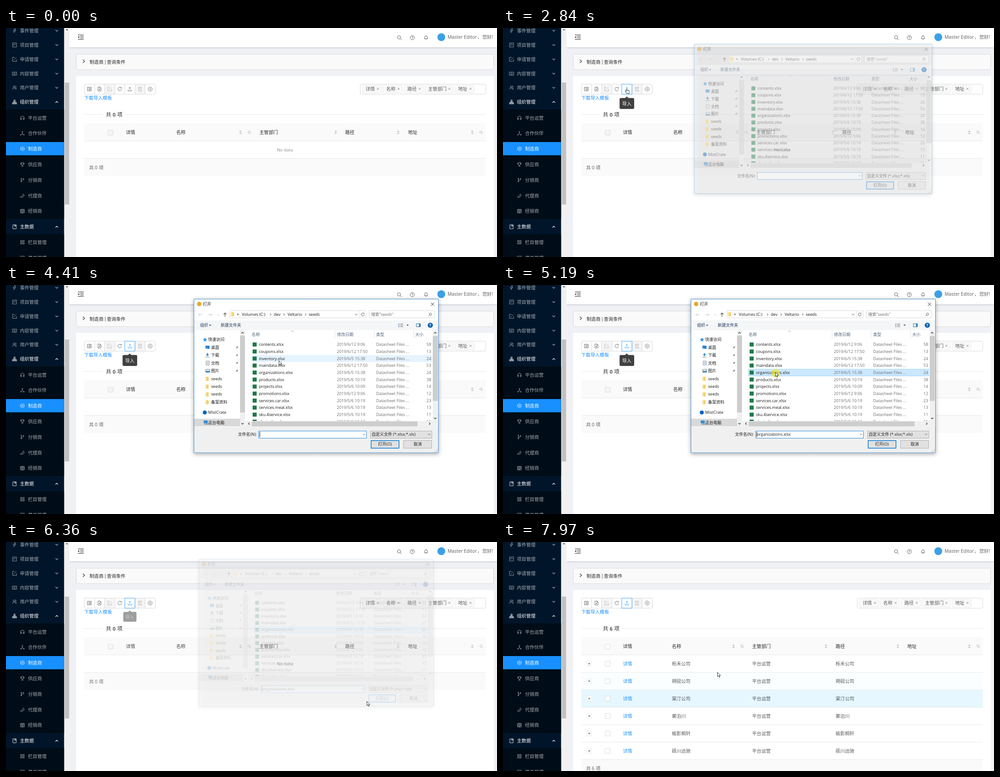
Recreate the animation shown at these times as an HTML page with a canvas. Size 1093 px wide and 512 px high, loop 8000 ms.

```html
<!DOCTYPE html>
<html lang="zh-CN">
<head>
<meta charset="utf-8">
<title>组织管理</title>
<style>
html,body{margin:0;width:100%;height:100%;overflow:hidden;background:#f0f2f5}
canvas{display:block;width:1093px;height:512px}
</style>
</head>
<body>
<canvas id="stage"></canvas>
<script>
const W = 1093, H = 512, LOOP = 8000;
const canvas = document.getElementById('stage');
const c = canvas.getContext('2d');
const dpr = window.devicePixelRatio || 1;
canvas.width = W * dpr;
canvas.height = H * dpr;

const FONT = '"Open Sans","Noto Sans CJK SC","Noto Sans CJK",sans-serif';
const BLUE = '#1890ff', INK = 'rgba(0,0,0,.85)', BODY = 'rgba(0,0,0,.65)', DIM = 'rgba(0,0,0,.45)';

// Line icons in a 10 x 10 box
const ring = (x, y, r) => `M${x - r} ${y}a${r} ${r} 0 1 0 ${2 * r} 0a${r} ${r} 0 1 0 ${-2 * r} 0`;
const ICON = {
  bolt: 'M5.5 .5L2 5.5h2.5L3.5 9.5 8 4H5.5L7 .5z',
  board: 'M.5 .5h9v9h-9zM3 2.5v4.5M5 2.5v2M7 2.5v3',
  edit: 'M9.5 5v4.5h-9v-9H5M3.5 6.5L9 1',
  read: 'M.2 1.5H4L5 2.3 6 1.5h3.8v7H6L5 9 4 8.5H.2zM5 2.3V9M1.7 4h1.6M1.7 6h1.6M6.7 4h1.6M6.7 6h1.6',
  team: ring(4, 3, 2) + 'M.5 9.5Q1 5.5 4 5.5T7.5 9.5M6.5 1Q9 1 8.5 3 8.3 4.5 7 5 9 6 9.5 9',
  tree: 'M3.5 .5h3v3h-3zM.3 7h2.4v2.4H.3zM3.8 7h2.4v2.4H3.8zM7.3 7h2.4v2.4H7.3zM5 3.5V7M1.5 7V5.2h7V7',
  phones: 'M.8 9V5a4.2 4.2 0 0 1 8.4 0V9H7V5.8h2.2M.8 5.8H3V9H.8',
  nodes: ring(5, 1.6, 1.1) + ring(1.5, 8.4, 1) + ring(8.5, 8.4, 1) + 'M5 2.8v3L2.3 7.7M5 5.8l2.7 1.9',
  gear: 'M5 .2L9.2 2.6v4.8L5 9.8 .8 7.4V2.6z' + ring(5, 5, 1.6),
  cup: 'M2.5 .8h5v3.5a2.5 2.5 0 0 1-5 0zM2.5 2H.7q0 3 2 3.2M7.5 2h1.8q0 3-2 3.2M5 7v2M2.5 9.3h5',
  branch: ring(2.5, 1.6, 1.1) + ring(2.5, 8.4, 1.1) + ring(7.5, 2.2, 1.1) + 'M2.5 2.8v4.4M7.5 3.3Q7.5 5 5 5.5T2.5 7.2',
  call: 'M7 .8L9.3 3Q9 8.5 1.5 9.3L.8 7 3 5.8 4.2 6.6Q6 5.5 6.5 4L5.7 3z',
  shop: 'M.5 .8h9v8.5h-9zM.5 3.6h9M.5 6h9M3.5 .8v2.8M6.5 .8v2.8M4 9.3V7.5h2v1.8',
  book: 'M1.2 .5h7.6v9H1.2zM5 .5v3.5l1.2-.8 1.2.8V.5',
  apps: 'M.8 .8h3.2v3.2H.8zM6 .8h3.2v3.2H6zM.8 6h3.2v3.2H.8zM6 6h3.2v3.2H6z',
  menu: 'M.5 1h9v8h-9zM2.5 3.5h5M2.5 5.5h5',
  list: 'M.5 .8h9v8.4h-9zM2.2 3h.8M4 3h4M2.2 5h.8M4 5h4M2.2 7h.8M4 7h4',
  add: 'M1.5 .2h4.5l2.5 2.5v7h-7zM6 .2V2.7h2.5M5 4.2v3.4M3.3 5.9h3.4',
  reload: 'M8.6 2.6A4.3 4.3 0 1 0 9.3 5.2M8.9 .6v2.2H6.7',
  upload: 'M.7 6.5v2.8h8.6V6.5M5 7V.8M3 2.8L5 .8l2 2',
  report: 'M8.5 4.5V.5h-7v9h3M3 2.8h4M3 4.8h2.5M5 9.5L7 6l2 3.5z',
  cancel: ring(5, 5, 4.7) + 'M3.4 3.4l3.2 3.2M6.6 3.4L3.4 6.6',
  search: ring(4, 4, 3.4) + 'M6.5 6.5L9.6 9.6',
  help: ring(5, 5, 4.7) + 'M3.6 4Q3.7 2.6 5 2.6T6.4 3.9Q6.4 4.7 5 5.4v.8M5 7v.8',
  bell: 'M1 8h8M2 8V4.5a3 3 0 0 1 6 0V8M4 9.6h2M5 1.5V.4',
  star: 'M5 0L6.5 3.4 10 3.8 7.4 6.2 8.2 10 5 8 1.8 10 2.6 6.2 0 3.8 3.5 3.4z',
  pin: 'M6 1l3 3-2.5 1L5 8 2 5l3-1.5zM3.5 6.5L1 9'
};
const paths = Object.fromEntries(Object.entries(ICON).map(([k, d]) => [k, new Path2D(d)]));
const ARROW = new Path2D('M0 0V9.6L2.2 7.6 3.8 11.2 5.3 10.5 3.7 7.1H6.8z');
const HAND = new Path2D('M0 1Q1 -.6 2 1V4l4 .9Q7.2 5.3 7 6.6L6 11H1.3L-2 6.8Q-1.6 5.6 0 6.8z');

function text(s, x, y, color = BODY, size = 10.33, weight = 400, align = 'left') {
  c.font = `${weight} ${size}px ${FONT}`;
  c.textAlign = align;
  c.fillStyle = color;
  c.fillText(s, x, y + size * .37);
}
function rect(x, y, w, h, color) {
  c.fillStyle = color;
  c.fillRect(x, y, w, h);
}
// Outer size includes the border
function box(x, y, w, h, fill, stroke, r = 0, lw = 1) {
  const inset = stroke ? lw / 2 : 0;
  c.beginPath();
  c.roundRect(x + inset, y + inset, w - 2 * inset, h - 2 * inset, r);
  if (fill) { c.fillStyle = fill; c.fill(); }
  if (stroke) { c.strokeStyle = stroke; c.lineWidth = lw; c.stroke(); }
}
function dot(x, y, r, color) {
  c.beginPath();
  c.arc(x, y, r, 0, 7);
  c.fillStyle = color;
  c.fill();
}
function line(color, lw, ...p) {
  c.beginPath();
  for (let i = 0; i < p.length; i += 2) c.lineTo(p[i], p[i + 1]);
  c.strokeStyle = color;
  c.lineWidth = lw;
  c.stroke();
}
function tri(x, y, w, h, color) {
  c.beginPath();
  c.moveTo(x - w, y - h);
  c.lineTo(x + w, y - h);
  c.lineTo(x, y + h);
  c.fillStyle = color;
  c.fill();
}
function icon(name, x, y, color, k = 1, fill) {
  c.save();
  c.translate(x - 5 * k, y - 5 * k);
  c.scale(k, k);
  c.strokeStyle = c.fillStyle = color;
  c.lineWidth = .85 / k;
  fill ? c.fill(paths[name]) : c.stroke(paths[name]);
  c.restore();
}
const chev = (x, y, w, h, color, lw = 1) => line(color, lw, x - w, y - h, x, y + h, x + w, y - h);
const chevR = (x, y, w, h, color, lw = 1) => line(color, lw, x - w, y - h, x + w, y, x - w, y + h);
function cross(x, y, r, color, lw = .9) {
  line(color, lw, x - r, y - r, x + r, y + r);
  line(color, lw, x - r, y + r, x + r, y - r);
}
const ramp = (t, a, b) => Math.max(0, Math.min(1, (t - a) / (b - a)));

// Bursts of activity: start, end, steps
const BURSTS = [[440, 1210, 11], [1360, 2160, 11], [2230, 2460, 4], [2610, 3400, 11], [3480, 4090, 9],
  [4260, 4720, 7], [4970, 5730, 11], [5810, 6580, 11], [6650, 7040, 6], [7570, 7660, 2], [7830, 7970, 3]];
function snap(t) {
  let out = 0;
  for (const [a, b, n] of BURSTS) {
    if (t < a) break;
    const step = (b - a) / (n - 1);
    out = a + Math.min(n - 1, Math.floor((t - a + 20) / step)) * step;
  }
  return out;
}

// Pointer route: time, x, y
const ROUTE = [[440, 966, 477], [640, 850, 425], [920, 540, 312], [1210, 382, 256], [1290, 382, 256],
  [1760, 302, 194.5], [2160, 271, 144], [2230, 272, 140], [2460, 274, 135], [2850, 274, 135],
  [3150, 380, 150], [3400, 500, 165], [3709, 580, 168.5], [3860, 600, 160], [4090, 608, 150],
  [4190, 608, 150], [4720, 606, 194.5], [5200, 606, 194.5], [5450, 690, 262], [5730, 786, 330],
  [5887, 803, 341], [6040, 838, 354], [6270, 838, 354], [6580, 700, 361], [6810, 647, 361],
  [7500, 647, 361], [7570, 656, 361], [7660, 667, 361], [7760, 667, 361], [7900, 560, 318], [7970, 477, 291]];
function pointer(t) {
  let i = 0;
  while (i < ROUTE.length - 2 && t > ROUTE[i + 1][0]) i++;
  const [a, x, y] = ROUTE[i], [b, u, v] = ROUTE[i + 1], k = ramp(t, a, b);
  return [x + (u - x) * k, y + (v - y) * k];
}
const CLICKS = [[2610, 2760], [5040, 5260], [6110, 6260]];

const TOP = [['bolt', '事件管理', 6], ['board', '项目管理', 38], ['edit', '申请管理', 70], ['read', '内容管理', 102],
  ['team', '用户管理', 133.5], ['tree', '组织管理', 165.5, 1], ['book', '主数据', 444.5, 1]];
const SUB = [['phones', '平台运营', 201], ['nodes', '合作伙伴', 235.5], ['gear', '制造商', 270], ['cup', '供应商', 305],
  ['branch', '分销商', 340], ['call', '代理商', 375], ['shop', '经销商', 409.5], ['apps', '栏目管理', 479], ['menu', '菜单管理', 514]];

function sidebar() {
  rect(129, 0, 12.5, H, '#f1f1f1');
  rect(131, 122, 9.5, 272.5, '#c1c1c1');
  tri(135.7, 3.5, 2.6, -1.5, '#505050');
  rect(0, 0, 129.3, H, '#001529');
  rect(0, 182, 129.3, 245, '#000c17');
  rect(0, 461, 129.3, 51, '#000c17');
  rect(0, 255, 129.3, 29.6, BLUE);
  const grey = 'rgba(255,255,255,.65)';
  for (const [ic, s, y, open] of TOP) {
    const col = open ? '#fff' : grey;
    icon(ic, 19, y, col);
    text(s, 31, y, col);
    chev(113, y, 2.8, open ? -1.5 : 1.5, col, 1.1);
  }
  for (const [ic, s, y] of SUB) {
    const col = y === 270 ? '#fff' : grey;
    icon(ic, 36.5, y, col, .95);
    text(s, 49, y, col);
  }
}

function header() {
  c.save();
  c.shadowColor = 'rgba(0,21,41,.2)';
  c.shadowBlur = 4 * dpr;
  c.shadowOffsetY = dpr;
  rect(141, 0, 952, 43, '#fff');
  c.restore();
  for (const [x, y] of [[160, 15.5], [165, 18.8], [165, 22.2], [160, 25.5]]) line('#333', 1.1, x, y, 173, y);
  c.beginPath();
  c.moveTo(160, 20.5); c.lineTo(163, 18); c.lineTo(163, 23);
  c.fillStyle = '#333';
  c.fill();
  icon('search', 876, 22, '#444', 1.05);
  icon('help', 904.5, 21.5, '#444');
  icon('bell', 935, 21, '#444', .95);
  dot(969, 20.5, 8.7, '#3ba0e6');
  text('Master Editor', 983, 20.5);
  text('，', 1049, 20.5);
  text('您好!', 1060.5, 20.5);
}

function toolbar(t) {
  const edges = i => 174 + i * 22.57;
  const hot = t >= 2230;
  ['list', 'add', 'edit', 'reload', 'upload', 'report', 'cancel'].forEach((ic, i) => {
    const off = i === 2 || i === 5, x = Math.round(edges(i));
    box(x, 125, Math.round(edges(i + 1)) - x + 1, 23.5, off ? '#f5f5f5' : '#fff', '#d9d9d9', i % 6 ? 0 : 2);
    icon(ic, edges(i) + 11.5, 136.5, off ? 'rgba(0,0,0,.28)' : hot && i === 4 ? BLUE : BODY, .95);
  });
  if (hot) box(264, 125, 23.5, 23.5, null, '#40a9ff');
  text('下载导入模板', 174, 156, BLUE);
  box(788, 125, 280.5, 23.5, '#fff', '#d9d9d9', 3);
  for (const [s, x, w] of [['详情', 793, 43.5], ['名称', 839, 43.5], ['路径', 886, 43.5], ['主管部门', 932, 63.5], ['地址', 999, 43.5]]) {
    box(x, 128, w, 17.5, '#fafafa', '#e8e8e8', 2);
    text(s, x + 7.5, 136.5);
    cross(x + w - 8.5, 136, 2.4, DIM);
  }
}

function tooltip(t) {
  const show = ramp(t, 2190, 2420) * (1 - ramp(t, 6270, 6430));
  if (!show) return;
  c.save();
  c.globalAlpha = show;
  c.translate(275.5, 153);
  c.scale(.8 + .2 * show, .8 + .2 * show);
  tri(0, 2, 4, -2, '#404040');
  box(-16, 3.5, 32.5, 24.5, '#404040', null, 3);
  text('导入', 0, 16, '#fff', 10.33, 400, 'center');
  c.restore();
}

const FIRMS = ['栎禾公司', '朔砚公司', '棠汀公司', '蘅泊川', '榆影桐轩', '砾川远驰'];
// Header columns: label, x, sorter x, search x
const EMPTY = [['详情', 267], ['名称', 379, 522, 542], ['主管部门', 564, 734], ['路径', 755, 873], ['地址', 895, 1038, 1058]];
const FILLED = [['详情', 267], ['名称', 376, 513, 532.5], ['主管部门', 554.5, 719], ['路径', 740.5, 879], ['地址', 900, 1038, 1058]];

function table(t) {
  const full = t >= 6490, n = full ? '6' : '0';
  line('#e8e8e8', 1, 174, 193.5, 215, 193.5);
  line('#e8e8e8', 1, 266, 193.5, 1068, 193.5);
  text('共', 222.5, 193.5, INK, 11.8);
  text(n, 237.5, 193.5, INK, 11, 600);
  text('项', 247.5, 193.5, INK, 11.8);

  c.save();
  if (t >= 6340) c.globalAlpha = full ? .5 + .5 * ramp(t, 6580, 7040) : 1 - .5 * ramp(t, 6300, 6490);
  rect(174, 213, 894, 39, '#fafafa');
  rect(174, 252, 894, 1, '#e8e8e8');
  box(227, 228, 12, 12, full ? '#fff' : '#f5f5f5', '#d9d9d9', 1.5);
  for (const [s, x, sort, find] of full ? FILLED : EMPTY) {
    text(s, x, 233.5, INK);
    if (sort) {
      tri(sort, 230.7, 3, -1.6, '#bfbfbf');
      tri(sort, 236, 3, 1.6, '#bfbfbf');
    }
    if (find) icon('search', find, 233.5, '#aaa', .75);
  }
  let foot = 291;
  if (full) {
    FIRMS.forEach((s, i) => {
      const top = 253 + i * 38.9, y = 272.2 + i * 38.9;
      if (i === 2) rect(174, top, 894, 38.5, '#e6f7ff');
      if (i === 1 && t >= 7965) rect(174, top, 894, 38.5, '#fafeff');
      rect(174, Math.round(top + 38), 894, 1, '#e8e8e8');
      box(186, Math.round(y - 6), 12, 12, '#fff', '#e8e8e8', 1);
      const m = Math.round(y - 6) + 6;
      line(BODY, .9, 189.7, m, 194.3, m);
      line(BODY, .9, 192, m - 2.3, 192, m + 2.3);
      box(227, Math.round(y - 6), 12, 12, '#fff', '#d9d9d9', 1.5);
      text('详情', 267, y, BLUE);
      text(s, 376, y);
      text('平台运营', 554.5, y);
      text(s, 740.5, y);
    });
    foot = 486;
  } else {
    text('No data', 621, 272, DIM, 9.8, 400, 'center');
    rect(174, 291, 894, 1, '#e8e8e8');
  }
  rect(174, foot + 1, 894, 39, '#fafafa');
  const fy = full ? 506 : 312;
  text('共', 185, fy);
  text(n, 197.7, fy, BODY, 10);
  text('项', 206.7, fy);
  c.restore();
}

const FILES = ['contents|6/12 9:06|58', 'coupons|6/12 17:50|13', 'inventory|6/5 15:38|24', 'maindata|6/12 17:50|53',
  'organizations|6/5 15:38|24', 'products|5/6 10:19|38', 'projects|5/6 10:09|14', 'promotions|6/12 9:06|12',
  'services.car|5/6 10:19|23', 'services.meal|5/6 10:19|13', 'sku.4service|5/6 10:19|11', 'sku.index|5/6 10:19|11']
  .map(s => s.split('|'));
const ROW = 15.68, D = '#1a1a1a', G = '#6d6d6d';
const small = (s, x, y, col = D) => text(s, x, y, col, 9.05);

function folder(x, y) {
  rect(x - 4, y - 4, 7, 9, '#f5cf6a');
  rect(x - 4, y - 4, 2.5, 9, '#fbe29a');
}

function navPane(t) {
  rect(419, 299, 102, 17, '#d9d9d9');
  icon('star', 443, 122, '#2b95e8', .95, true);
  small('快速访问', 450, 122);
  ['桌面', '下载', '文档', '图片', 'seeds', 'seeds', 'seeds', '备案资料'].forEach((s, i) => {
    const y = 139.7 + i * 17.4;
    if (i > 3) folder(448, y);
    else {
      icon('pin', 514, y, '#777', .75, true);
      if (i === 0) { rect(444, y - 4, 9, 7, '#1b82d2'); rect(445, y + 1, 3, 1, '#fff'); }
      if (i === 1) { rect(444, y + 3, 9, 1.5, '#8aa'); line('#1b82d2', 2, 448.5, y - 5, 448.5, y); tri(448.5, y, 3.5, 2, '#1b82d2'); }
      if (i === 2) { box(445, y - 5, 8, 10, '#fff', '#888'); rect(447, y - 2, 4, 1, '#3a8fd0'); rect(447, y + 1, 4, 1, '#3a8fd0'); }
      if (i === 3) { box(444, y - 4, 10, 8, '#dff0fb', '#888'); rect(445, y, 8, 3, '#3a8fd0'); }
    }
    small(s, 456.5, y);
  });
  dot(442.5, 285, 4.5, '#0a64c0');
  small('MistCrate', 450, 285);
  rect(440, 303, 9, 6, '#2f8fd8');
  rect(442, 310, 8, 1.5, '#667');
  small('这台电脑', 450, 308);

  const k = ramp(t, 3180, 3320) * (1 - ramp(t, 3709, 4060));
  if (k) {
    c.save();
    c.globalAlpha *= k;
    chev(427, 122.5, 3, 1.5, '#555');
    chevR(427, 285, 1.5, 3, '#aaa');
    chevR(427, 308, 1.5, 3, '#aaa');
    c.restore();
  }
  rect(521, 101, 11, 216, '#f0f0f0');
  rect(521, 113, 11, 172, '#cdcdcd');
  chev(526.5, 107, 2.5, -1.3, '#444', 1.3);
  chev(526.5, 310, 2.5, 1.3, '#444', 1.3);
}

function fileList(t, px, py) {
  small('名称', 547, 111, '#4c607a');
  small('修改日期', 737, 111, '#4c607a');
  small('类型', 824, 111, '#4c607a');
  small('大小', 911, 111, '#4c607a');
  for (const x of [732, 819, 907]) rect(x, 101, 1, 19, '#e2e2e2');
  chev(637.5, 103.5, 2.6, -1.2, '#777', .8);

  c.save();
  c.beginPath();
  c.rect(533, 120, 416, 184);
  c.clip();
  const over = px > 546 && px < 949 && py < 304 ? Math.floor((py - 125.2) / ROW) : -1;
  FILES.forEach(([name, date, kb], i) => {
    const y = 133 + i * ROW;
    if (i === 4 && t >= 5040) box(546, y - 8, 404, 16, '#cce8ff', '#99d1ff');
    else if (i === over) rect(546, y - 7.8, 404, ROW, '#e5f3ff');
    rect(549, y - 4.5, 9, 9, '#1f7a48');
    small(name + '.xlsx', 563, y);
    small('2019/' + date, 736.5, y, G);
    small('Datasheet Files ...', 824, y, G);
    small(kb, 936, y, G);
  });
  c.restore();
  rect(950, 101, 11, 203, '#f0f0f0');
  rect(950, 114, 11, 145, '#cdcdcd');
  chev(955.5, 107, 2.5, -1.3, '#444', 1.3);
  chev(955.5, 298, 2.5, 1.3, '#444', 1.3);
  rect(533, 304, 428, 13, '#f0f0f0');
  rect(547, 305, 369, 11, '#cdcdcd');
  chevR(541, 310, -1.3, 2.6, '#444', 1.3);
  chevR(943, 310, 1.3, 2.6, '#444', 1.3);
}

function dialog(t, px, py) {
  const show = ramp(t, 2790, 2920) * (1 - ramp(t, 6250, 6370));
  if (!show) return;
  c.save();
  c.globalAlpha = show;
  const k = .95 + .05 * show;
  c.translate(690 - 690 * k, 203 - 203 * k);
  c.scale(k, k);
  c.save();
  c.shadowColor = 'rgba(0,0,0,.35)';
  c.shadowBlur = 9 * dpr;
  c.shadowOffsetY = 2 * dpr;
  rect(418, 31, 545, 344.5, '#fff');
  c.restore();

  dot(430, 42.5, 5, '#e6a72e');
  small('打开', 438.5, 43);
  cross(949.5, 43, 3.6, '#222', 1);

  for (const [x, s] of [[433, 1], [454.5, -1]]) {
    line('#c4c4c4', 1, x - 4, 66.5, x + 4, 66.5);
    line('#c4c4c4', 1, x - s, 63.5, x - 4 * s, 66.5, x - s, 69.5);
  }
  chev(472.5, 66.5, 2, 1, '#bbb');
  line('#444', 1.1, 487.5, 71, 487.5, 62.5);
  line('#444', 1.1, 484.3, 65.7, 487.5, 62.5, 490.7, 65.7);
  box(498, 57, 304, 17, '#fff', '#d9d9d9');
  folder(504.5, 65);
  small('«', 514, 65);
  small('Volumes (C:)', 525, 65.5);
  small('dev', 596, 65.5);
  small('Veltario', 627, 65.5);
  small('seeds', 674, 65.5);
  for (const x of [589, 619, 667]) chevR(x, 66, 1.3, 2.5, '#444');
  chev(779.5, 66, 2.6, 1.4, '#444');
  rect(786, 58, 1, 15, '#e2e2e2');
  icon('reload', 794, 66, '#444', .8);
  box(808, 57, 147, 17, '#fff', '#d9d9d9');
  small('搜索"seeds"', 813, 65.5, G);
  c.save();
  c.translate(944, 66);
  c.scale(-1, 1);
  icon('search', 0, 0, '#444', .75);
  c.restore();

  rect(419, 79, 543, 22, '#f5f6f7');
  small('组织', 432, 90, '#1e395b');
  tri(454.5, 90.3, 2.6, 1.3, '#1e395b');
  small('新建文件夹', 478, 90, '#1e395b');
  for (const y of [86.5, 89.5, 92.5]) {
    rect(873, y, 3, 1.4, '#6a8db0');
    rect(877.5, y, 6.5, 1.2, '#888');
  }
  tri(894, 90, 2.5, 1.3, '#333');
  box(913, 86, 10, 8, '#fff', '#2b6fa8');
  rect(919, 87, 3, 6, '#3f8fd0');
  dot(944.5, 90, 5.8, '#0a62b3');
  text('?', 944.5, 90, '#fff', 9, 700, 'center');

  navPane(t);
  fileList(t, px, py);

  rect(419, 317, 543, 58, '#f0f0f0');
  small('文件名(N):', 516.5, 334);
  const drop = t >= 5800 && t < 5950;
  box(562, 326, 241, 17, '#fff', drop ? '#555' : '#2a87d8');
  if (drop) box(791, 326, 12, 17, '#e5f1fb', '#2a87d8');
  chev(797, 334, 2.3, 1.2, '#555');
  if (t >= 5040) small('organizations.xlsx', 565, 334);
  if (Math.floor((t - 3500) / 530) % 2 === 1) rect(564.5, 328, 1, 12, '#000');
  box(811, 326, 137.5, 17, '#e1e1e1', '#adadad');
  small('自定义文件 (*.xlsx;*.xls)', 814, 334);
  chev(942, 334, 2.3, 1.2, '#555');
  box(812, 347, 63.5, 18.5, t >= 6000 ? '#e5f1fb' : '#e1e1e1', '#0078d7', 0, 1.5);
  text('打开(O)', 843.5, 356, D, 9.05, 400, 'center');
  box(884.5, 347, 63.5, 18.5, '#e1e1e1', '#adadad');
  text('取消', 916.5, 356, D, 9.05, 400, 'center');
  for (let i = 0; i < 3; i++)
    for (let j = 0; j <= i; j++) rect(959 - j * 2.6, 367 + i * 2.6, 1.3, 1.3, '#b0b0b0');
  box(418, 31, 545, 344.5, null, '#4a94d6');
  c.restore();
}

function drawPointer(t, x, y) {
  if (t < 440) return;
  if (CLICKS.some(([a, b]) => t >= a && t < b)) dot(x + .5, y + 2.5, 9.5, 'rgba(240,228,40,.65)');
  const hand = t >= 2230 && t < 2880;
  c.save();
  c.translate(x + .5, y + .5);
  c.fillStyle = '#fff';
  c.strokeStyle = '#222';
  c.lineWidth = .9;
  c.lineJoin = 'round';
  c.fill(hand ? HAND : ARROW);
  c.stroke(hand ? HAND : ARROW);
  c.restore();
}

function draw(now) {
  const t = snap(now % LOOP);
  const [px, py] = pointer(t);
  c.setTransform(dpr, 0, 0, dpr, 0, 0);
  rect(0, 0, W, H, '#f0f1f5');
  box(156, 58, 930, 35.5, '#fafafa', '#d9d9d9', 3);
  chevR(173, 74.5, 2, 3.6, '#222', 1.1);
  text('制造商', 186, 76, INK);
  text('|', 218.3, 75.5, INK, 10);
  text('查询条件', 224.5, 76, INK);
  rect(156, 107, 930, 405, '#fff');
  toolbar(t);
  table(t);
  tooltip(t);
  header();
  sidebar();
  dialog(t, px, py);
  drawPointer(t, px, py);
}

const start = performance.now();
function loop() {
  draw(performance.now() - start);
  requestAnimationFrame(loop);
}
loop();
</script>
</body>
</html>
```
